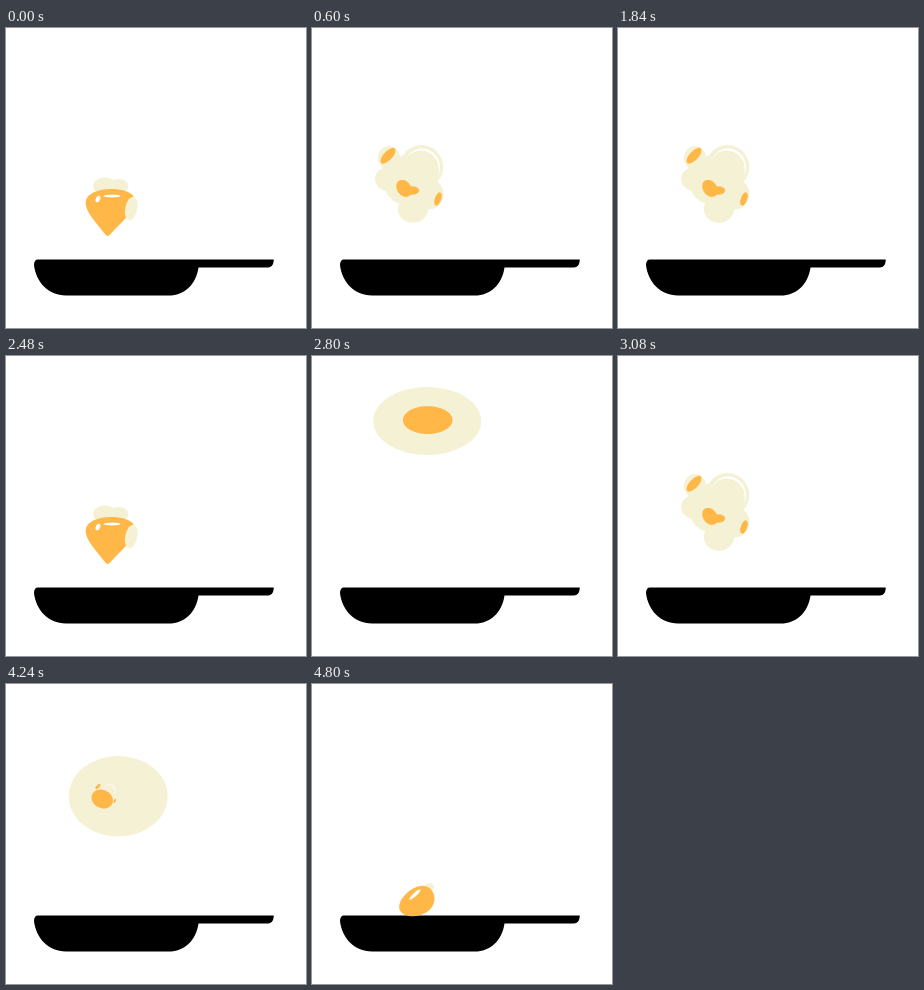
Recreate the animation shown at these times as an HTML page with a canvas. Size 300x300 px, loop 4.96 s.

```html
<!DOCTYPE html>
<html lang="en">
<head>
<meta charset="utf-8">
<title>Egg toss</title>
<style>
html, body { margin: 0; width: 100%; height: 100%; overflow: hidden; background: #fff; }
canvas { display: block; width: 300px; height: 300px; }
</style>
</head>
<body>
<canvas id="stage"></canvas>
<script>
const canvas = document.getElementById('stage');
const ctx = canvas.getContext('2d');
const ratio = window.devicePixelRatio || 1;
canvas.width = canvas.height = 300 * ratio;

const STEP = 40, TOSS = 1240;
const CATCH = 15, LAST = 27;
const CREAM = '#f4f1d4', YOLK = '#ffb848', SHINE = '#fff';
const PAN = new Path2D('M32 231.4H267.7V233Q267 239.4 262 239.4H192.5C190 257 178 267.4 163 267.4H60C42 267.4 30 254 28 237Q28 231.4 32 231.4Z');

const lerp = (a, b, t) => a + (b - a) * t;
const smooth = t => t * t * (3 - 2 * t);

// Height of the egg: a thrown arc, stopped by the pan.
const height = k => Math.min(222, 65 + 1.833 * (k - 7.92) ** 2);

function oval(color, x, y, rx, ry, tilt = 0) {
  ctx.fillStyle = color;
  ctx.beginPath();
  ctx.ellipse(x, y, rx, ry, tilt, 0, 2 * Math.PI);
  ctx.fill();
}

// The egg white spreads in the air, then once more on the pan.
function drawSheet(k) {
  if (k < CATCH) {
    const open = 1 - Math.abs(2 * k / CATCH - 1) ** 8;
    oval(CREAM, 120 - 0.6 * k, height(k), 54 * open, (18 + 2 * k) * open);
  } else {
    const open = Math.sqrt(Math.abs(Math.sin(Math.PI * (k - CATCH) / (LAST - CATCH))));
    oval(CREAM, 111.5, height(k) + 1, 48 * open, 11 * open);
  }
}

// Yolk shape at a few moments; y is measured from the egg's height.
const yolkKeys = [
  { at: 0,    x: 103.5, y: 4.5, rx: 20.8, ry: 23.5, taper: 0.73,  skew: -2 },
  { at: 7.5,  x: 116,   y: -1,  rx: 25,   ry: 14,   taper: 0,     skew: 0 },
  { at: 15,   x: 92,    y: 3.5, rx: 7.5,  ry: 8.5,  taper: 0,     skew: 2 },
  { at: 18.5, x: 107,   y: -5,  rx: 25,   ry: 11,   taper: 0,     skew: 0 },
  { at: 27,   x: 105.5, y: -5,  rx: 16.8, ry: 15.2, taper: -0.15, skew: -5 }
];

function drawYolk(k) {
  const i = Math.max(1, yolkKeys.findIndex(key => key.at >= k));
  const a = yolkKeys[i - 1], b = yolkKeys[i];
  const t = smooth((k - a.at) / (b.at - a.at));
  const mix = name => lerp(a[name], b[name], t);
  const x = mix('x'), y = mix('y') + height(k), rx = mix('rx'), ry = mix('ry');
  const taper = mix('taper'), skew = mix('skew');
  ctx.fillStyle = YOLK;
  ctx.beginPath();
  for (let angle = 0; angle < 2 * Math.PI; angle += 0.05) {
    const s = Math.sin(angle), c = Math.cos(angle);
    ctx.lineTo(x + rx * c * (1 - taper * s) + skew * s, y + ry * s);
  }
  ctx.fill();
}

// Lumps and glints that swell out of the egg around one moment.
const poses = [
  {
    at: 0, reach: 4,
    back() {
      oval(CREAM, 99, 158, 12, 8.5);
      oval(CREAM, 112, 158, 10.5, 7);
    },
    front() {
      oval(CREAM, 125.3, 180.5, 6, 12, 0.2);
      oval(SHINE, 106, 168, 8.5, 1.4);
      oval(SHINE, 92, 171, 2.2, 3.4, 0.4);
    }
  },
  {
    at: CATCH, reach: 3,
    back() {
      oval(CREAM, 77, 130, 11, 12);
      oval(CREAM, 75.5, 151, 12.5, 11.5);
      oval(CREAM, 109.5, 139, 21.7, 22);
      oval(CREAM, 95, 152, 24, 25);
      oval(CREAM, 116, 166, 15.5, 15.5);
      oval(CREAM, 101, 181, 15, 13.7);
      oval(SHINE, 110, 139, 18, 18.5);
      oval(CREAM, 108.8, 141, 18, 18.5);
    },
    front() {
      oval(YOLK, 100, 162.5, 7.2, 4.2);
      oval(YOLK, 76, 127.7, 4.4, 10, 0.75);
      oval(YOLK, 126, 171, 3.2, 7, 0.35);
    }
  },
  {
    at: LAST, reach: 6,
    back() { oval(CREAM, 117.5, 203, 4.5, 4); },
    front() { oval(SHINE, 103, 210.5, 7.5, 1.8, -0.75); }
  }
];

function drawPose(pose, side, k) {
  const size = 1 - Math.abs(k - pose.at) / pose.reach;
  if (size <= 0) return;
  ctx.save();
  ctx.translate(100, height(k));
  ctx.scale(size, size);
  ctx.translate(-100, -height(pose.at));
  pose[side]();
  ctx.restore();
}

function draw(ms) {
  const k = Math.min(LAST, Math.floor((ms % TOSS) / STEP));
  ctx.setTransform(ratio, 0, 0, ratio, 0, 0);
  ctx.fillStyle = '#fff';
  ctx.fillRect(0, 0, 300, 300);
  ctx.fillStyle = '#000';
  ctx.fill(PAN);
  drawSheet(k);
  poses.forEach(pose => drawPose(pose, 'back', k));
  drawYolk(k);
  poses.forEach(pose => drawPose(pose, 'front', k));
}

const start = performance.now();
function tick() {
  draw(Math.max(0, performance.now() - start));
  requestAnimationFrame(tick);
}
tick();
</script>
</body>
</html>
```
